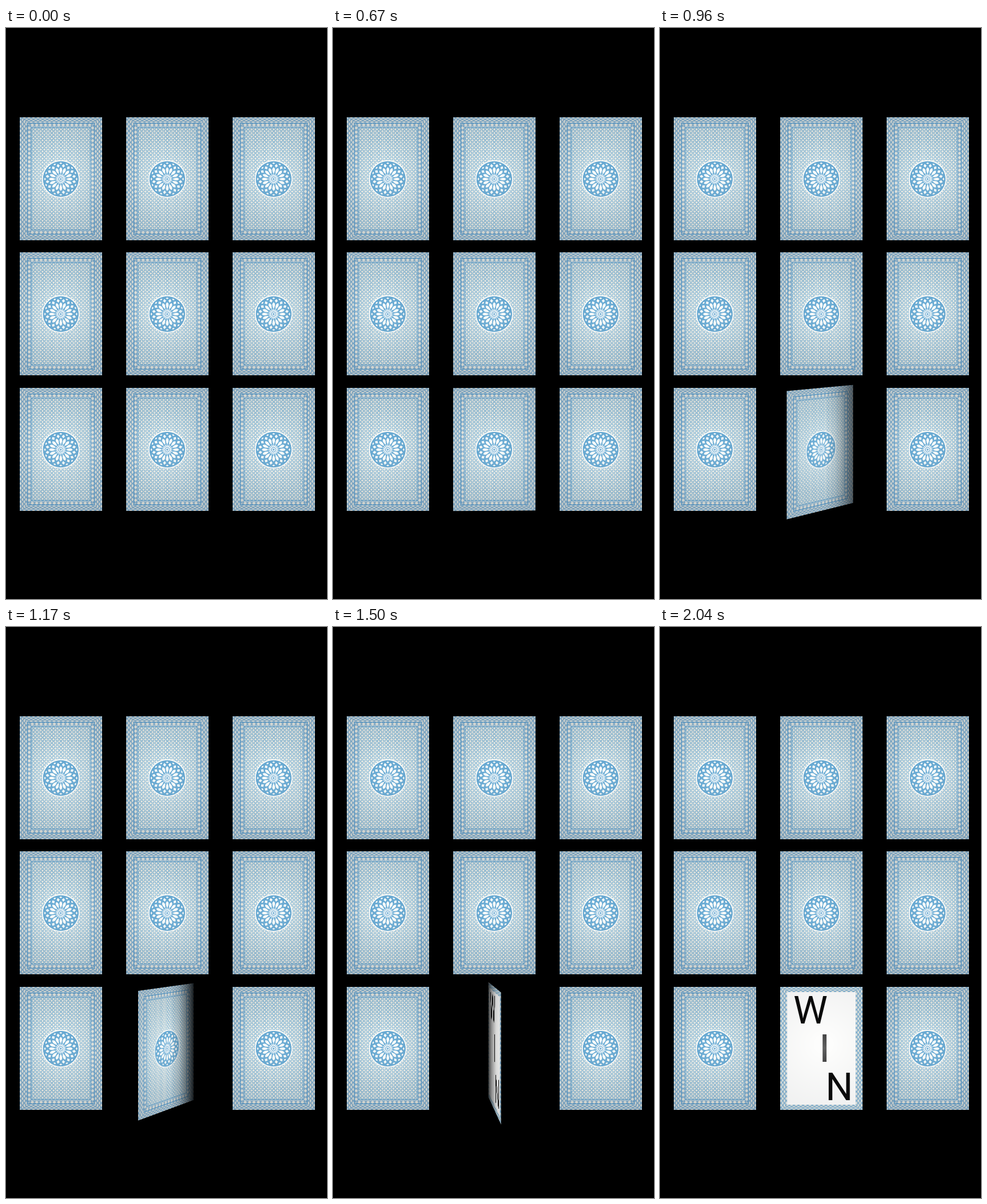
Recreate the animation shown at these times as an HTML page with a canvas. Size 561 by 998 pixels, loop 2.08 s.

```html
<!DOCTYPE html>
<html lang="en">
<head>
<meta charset="utf-8">
<title>Card flip</title>
<style>
  html, body { margin: 0; width: 100%; height: 100%; overflow: hidden; background: #000; }
  #stage {
    position: absolute; left: 0; top: 0; width: 561px; height: 998px; overflow: hidden;
    perspective: 1025px; perspective-origin: 280.5px 499px;
  }
  .card, .face, .face > * { position: absolute; width: 143.5px; height: 215px; }
  .face, .face > * { left: 0; top: 0; }
  #flip { transform-style: preserve-3d; }
  .face { backface-visibility: hidden; }
  .front { transform: rotateY(180deg); }
  .back .shade {
    background: linear-gradient(to left, rgba(0,0,0,.85), rgba(0,0,0,.5) 12%, rgba(0,0,0,.16) 28%, rgba(0,0,0,0) 45%);
  }
  .front .shade {
    background: linear-gradient(to right, rgba(0,0,0,.75), rgba(0,0,0,.42) 30%, rgba(0,0,0,.14) 65%, rgba(0,0,0,.05));
  }
  text { font: 67.5px Roboto, "Open Sans", sans-serif; text-anchor: middle; fill: #0a0a0a; }
  #gloss { fill: url(#sheen); }
</style>
</head>
<body>
<div id="stage"></div>
<script>
const W = 143.5, H = 215, SCALE = 2, LOOP = 2080;
const BLUE = '#579fcf', CREAM = '#f5f4ea', WHITE = '#f9fbf9';
const stage = document.getElementById('stage');

function surface() {
  const c = document.createElement('canvas');
  c.width = W * SCALE;
  c.height = H * SCALE;
  const g = c.getContext('2d');
  g.scale(SCALE, SCALE);
  return [c, g];
}

function poly(g, pts) {
  g.beginPath();
  pts.forEach(([x, y]) => g.lineTo(x, y));
  g.closePath();
}

function diamond(g, x, y, rx, ry) {
  poly(g, [[x - rx, y], [x, y - ry], [x + rx, y], [x, y + ry]]);
  g.fill();
}

// Mitred frame between two insets, filled with rows of diamonds on all four sides.
function frame(g, x0, y0, x1, y1, rows, step) {
  const sides = [
    [[1, 0, 0, 1, 0, 0], W, x0, y0, x1, y1],
    [[1, 0, 0, -1, 0, H], W, x0, y0, x1, y1],
    [[0, 1, 1, 0, 0, 0], H, y0, x0, y1, x1],
    [[0, 1, -1, 0, W, 0], H, y0, x0, y1, x1]
  ];
  for (const [m, len, a0, b0, a1, b1] of sides) {
    g.save();
    g.transform(...m);
    poly(g, [[a0, b0], [len - a0, b0], [len - a1, b1], [a1, b1]]);
    g.clip();
    g.fillStyle = '#649fca';
    g.fillRect(0, 0, len, b1);
    const h = (b1 - b0) / rows;
    const n = Math.round((len - 2 * a0) / step), s = (len - 2 * a0) / n;
    g.fillStyle = '#eeeee4';
    for (let j = 0; j < rows; j++)
      for (let i = 0; i <= n; i++)
        diamond(g, a0 + (i + j % 2 / 2) * s, b0 + (j + .5) * h, s * .52, h * .52);
    g.restore();
  }
}

function ring(g, inset, insetY, color, width) {
  g.strokeStyle = color;
  g.lineWidth = width;
  g.strokeRect(inset, insetY, W - 2 * inset, H - 2 * insetY);
}

function disc(g, r, color) {
  g.fillStyle = color;
  g.beginPath();
  g.arc(0, 0, r, 0, 7);
  g.fill();
}

// Field of interlocking circles, built from diagonal leaves.
function field(g) {
  const x0 = 20.5, y0 = 18, cols = 16, rows = 28;
  const w = (W - 2 * x0) / cols, h = (H - 2 * y0) / rows;
  g.fillStyle = CREAM;
  g.fillRect(x0, y0, W - 2 * x0, H - 2 * y0);
  g.fillStyle = '#62a7d3';
  for (let r = 0; r < rows; r++)
    for (let c = 0; c < cols; c++)
      for (let k = 0; k < 4; k++) {
        const sx = k % 2 ? 1 : -1, sy = k < 2 ? 1 : -1;
        g.beginPath();
        g.ellipse(x0 + (c + .5 + sx * .25) * w, y0 + (r + .5 + sy * .25) * h,
          1.75, .68, sx * sy * Math.PI / 4, 0, 7);
        g.fill();
      }
}

function medallion(g) {
  const n = 16;
  g.save();
  g.translate(71.5, 108);
  disc(g, 33, WHITE);
  disc(g, 31, '#4c9bcc');
  for (let i = 0; i < n; i++) {
    g.save();
    g.rotate(i * 2 * Math.PI / n);
    g.fillStyle = WHITE;
    g.beginPath();
    g.moveTo(0, -9);
    g.bezierCurveTo(2, -13, 4, -18, 0, -20.5);
    g.bezierCurveTo(-4, -18, -2, -13, 0, -9);
    g.fill();
    diamond(g, 0, -27.6, 2.6, 1.5);
    g.rotate(Math.PI / n);
    diamond(g, 0, -23.6, 2.7, 3.2);
    g.restore();
  }
  disc(g, 8.5, WHITE);
  g.fillStyle = BLUE;
  for (let i = 0; i < n; i++) {
    g.save();
    g.rotate((i + .5) * 2 * Math.PI / n);
    diamond(g, 0, -7.2, .9, 1.9);
    g.restore();
  }
  disc(g, 4.6, BLUE);
  disc(g, 3.3, WHITE);
  disc(g, 1.8, BLUE);
  g.restore();
}

function glow(g, x, y, r, inner, outer) {
  const f = g.createRadialGradient(x, y, 15, x, y, r);
  f.addColorStop(0, inner);
  f.addColorStop(1, outer);
  g.fillStyle = f;
  g.fillRect(0, 0, W, H);
}

function drawBack() {
  const [c, g] = surface();
  g.fillStyle = '#e6ecea';
  g.fillRect(0, 0, W, H);
  field(g);
  frame(g, 0, 0, 12.5, 9.5, 4, 8);
  ring(g, 13.2, 10.4, BLUE, 1);
  frame(g, 14.2, 11.2, 18.6, 15.8, 1, 7.5);
  ring(g, 20, 17.6, BLUE, 1.2);
  medallion(g);
  glow(g, 72, 112, 75, 'rgba(255,255,255,.22)', 'rgba(255,255,255,0)');
  glow(g, 68, 100, 150, 'rgba(50,65,85,0)', 'rgba(50,65,85,.22)');
  return c;
}

function drawFront() {
  const [c, g] = surface();
  frame(g, 0, 0, 12, 9, 4, 8);
  g.fillStyle = '#fdfdfc';
  g.fillRect(12, 9, W - 24, H - 18);
  glow(g, 76, 100, 150, 'rgba(90,100,110,0)', 'rgba(90,100,110,.1)');
  return c;
}

function copy(src) {
  const [c, g] = surface();
  g.drawImage(src, 0, 0, W, H);
  return c;
}

function place(el, x, y) {
  el.classList.add('card');
  el.style.left = x + 'px';
  el.style.top = y + 'px';
  stage.append(el);
}

const back = drawBack();
for (let i = 0; i < 9; i++)
  if (i !== 7) place(copy(back), 24 + i % 3 * 186.2, 155.5 + Math.floor(i / 3) * 236.5);

const flip = document.createElement('div');
flip.id = 'flip';
flip.innerHTML = `
  <div class="face back"><div class="shade"></div></div>
  <div class="face front">
    <svg viewBox="0 0 143.5 215">
      <defs><linearGradient id="sheen" x1="0" y1="0" x2="0" y2="1">
        <stop offset="0" stop-color="#333"/><stop offset=".5" stop-color="#606060"/><stop offset="1" stop-color="#333"/>
      </linearGradient></defs>
      <text x="53" y="63.5">W</text>
      <text x="77.75" y="130.5">I</text>
      <text id="gloss" x="77.75" y="130.5" aria-hidden="true">I</text>
      <text x="103.25" y="197.5">N</text>
    </svg>
    <div class="shade"></div>
  </div>`;
place(flip, 210, 628.5);
flip.querySelector('.back').prepend(back);
flip.querySelector('.front').prepend(drawFront());
const [backShade, frontShade] = flip.querySelectorAll('.shade');
const gloss = document.getElementById('gloss');

function ease(t, from, to) {
  const u = Math.min(1, Math.max(0, (t - from) / (to - from)));
  return u * u * (3 - 2 * u);
}

// A slow lift to 45 degrees, then the full turn.
const angle = t => 45 * ease(t, 630, 1090) + 135 * ease(t, 1090, 2040);

function draw(now) {
  const t = Math.floor(now % LOOP / 10) * 10;
  const a = angle(t);
  const tilt = Math.sin(a * Math.PI / 180) ** 2;
  flip.style.transform = `rotateY(${a}deg)`;
  backShade.style.opacity = Math.min(1, 1.8 * tilt);
  frontShade.style.opacity = tilt;
  gloss.style.opacity = ease(a, 150, 180);
}

const start = performance.now();
function tick() {
  draw(performance.now() - start);
  requestAnimationFrame(tick);
}
tick();
</script>
</body>
</html>
```
